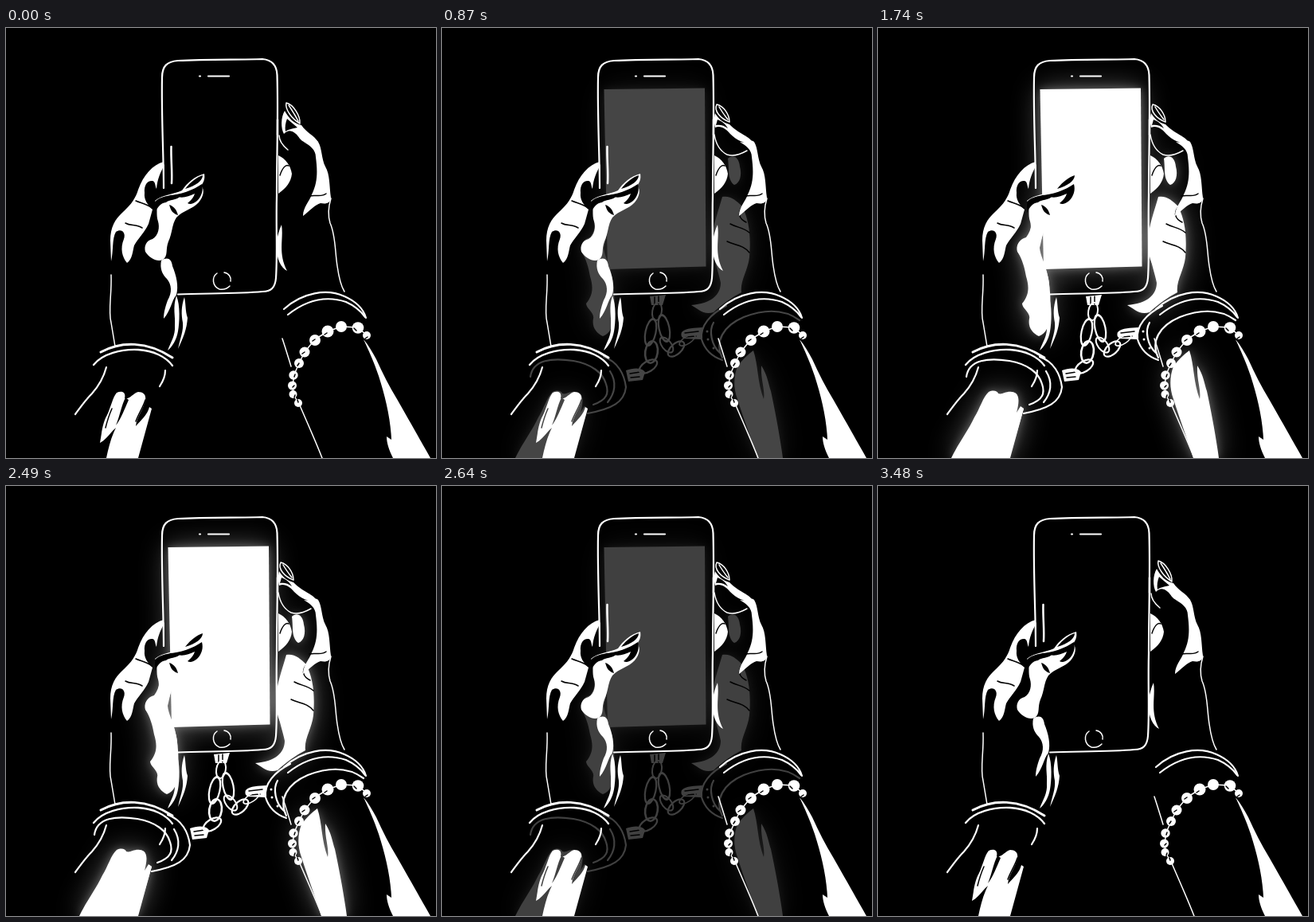
Write an HTML page that moves like this. It is 540 px wide and 540 px high and loops after 4.5 s.

```html
<!DOCTYPE html>
<html lang="en">
<head>
<meta charset="utf-8">
<title>Phone shackles</title>
<style>
html, body { margin: 0; width: 100%; height: 100%; overflow: hidden; background: #000; }
svg { display: block; width: 100%; height: 100%; }
.ink { fill: #fff; }
.cut { fill: #000; }
.line { fill: none; stroke: #fff; stroke-width: 2.2; stroke-linecap: round; stroke-linejoin: round; }
.crease { fill: none; stroke: #000; stroke-width: 1.5; stroke-linecap: round; }
.thin { stroke-width: 1.5; }
.bold { stroke-width: 3; }
.near { filter: blur(6px); opacity: .28; }
.far { filter: blur(18px); opacity: .34; }
#lit, #up, #down { animation: 4500ms infinite; }
#lit { animation-name: light; opacity: 0; }
#up { animation-name: lift; animation-timing-function: step-end; }
#down { animation-name: tap; animation-timing-function: step-end; }
@keyframes light {
  0% { opacity: 0; }
  18.667% { opacity: 0; animation-timing-function: cubic-bezier(.333, 0, .667, 1); }
  20.667% { opacity: 1; }
  56% { opacity: 1; animation-timing-function: cubic-bezier(.333, 0, .667, 1); }
  60%, 100% { opacity: 0; }
}
@keyframes lift { 0%, 60.66% { opacity: 1; } 18.66% { opacity: 0; } 100% { opacity: 1; } }
@keyframes tap { 0%, 60.66% { opacity: 0; } 18.66% { opacity: 1; } 100% { opacity: 0; } }
</style>
</head>
<body>
<svg viewBox="0 0 540 540">
  <defs>
    <ellipse id="link" class="line" rx="6.500" ry="12.500"/>
    <g id="shine" class="ink">
      <path d="M203.500 77L330 75.500L331.500 299.500L208 303Z"/>
      <!-- left palm and arm -->
      <path d="M197 223C206 226 213 232 213 240C207 252 206 266 203 276C204 286 209 294 212 306C217 325 217 345 216 362C215 374 211 384 202 387C194 383 188 376 190 365C192 358 181 352 181 346C190 335 190 325 186 312C184 300 181 291 176 282C173 272 178 265 186 263C194 253 194 238 197 223Z"/>
      <path d="M139 457C145 454 150 456 151 459C156 461 160 456 168 457C178 458 178 468 174 483L179 475L183 478L165 540H92C102 520 113 506 121 489C128 478 132 463 139 457Z"/>
      <!-- right palm, finger and arm -->
      <path d="M352 212C347 230 340 248 339 266C340 288 347 305 350 320C350 335 338 346 313 348C321 352 328 361 341 357C352 347 364 338 376 332C374 318 384 305 386 288C388 262 386 242 377 224C370 217 362 210 352 212Z"/>
      <path d="M359 164C365 158 373 162 374 174C377 185 374 195 367 197C358 190 361 178 359 164Z"/>
      <path d="M391 405C397 422 396 446 404 466C406 455 400 442 401 424C409 436 410 448 413 456C418 480 424 510 428 540H396C388 515 378 488 371 466C366 452 366 438 371 425C378 416 384 410 391 405Z"/>
    </g>
  </defs>

  <!-- arms -->
  <path class="ink" d="M139 458C145 455 151 457 149 465C155 467 159 459 166 457C173 457 176 461 175 467C173 479 164 488 163 500C170 492 178 485 180 476L183 478L166 540H126C129 526 132 514 138 502C131 508 126 517 118 521C120 510 121 496 127 486C132 475 134 464 139 458Z"/>
  <path class="cut" d="M150 464C145 474 143 487 138 499C145 490 149 478 154 467Z"/>
  <path class="crease" d="M133 478C129 487 127 494 125 502M175 467C172 477 167 483 163 494"/>
  <path class="line thin" d="M347 390C351 402 354 412 358 425M369 474C378 495 388 517 397 540"/>
  <path class="ink" d="M449 391C455 398 460 407 465 416C473 434 482 451 491 466C507 494 520 517 533 540H486C481 530 478 521 478 513L484 517C483 490 476 462 468 437C462 419 455 404 449 391Z"/>

  <g id="lit">
    <use href="#shine" class="far"/>
    <use href="#shine" class="near"/>
    <use href="#shine"/>
    <path class="crease" d="M362 246C371 251 378 250 386 257M358 268C368 273 378 272 386 282M376 226C372 232 372 239 382 244"/>

    <!-- cuffs -->
    <path class="line" d="M111 438C114 416 139 414 165 418C188 422 202 433 206 447C210 459 207 467 190 473M203 413C221 419 229 435 231 451C229 470 214 478 183 484M211 431C220 445 217 459 208 470"/>
    <path class="line" d="M357 349C337 359 324 374 326 391C330 404 340 413 352 417M352 414C342 394 353 374 379 363C405 353 430 353 449 367M341 370C335 380 338 398 349 408"/>
    <g class="ink">
      <circle cx="333" cy="381" r="1.500"/><circle cx="334" cy="391" r="1.500"/><circle cx="341" cy="402" r="1.500"/>
      <path d="M261 337L281 335L277 348L263 348Z"/>
      <path d="M301 382C307 376 317 377 327 376L325 391L304 390C300 388 300 385 301 382Z"/>
      <path d="M231 430C240 427 250 426 255 432L252 442L234 444Z"/>
    </g>
    <path class="crease" d="M267 338V347M272 337V347M305 383L322 381M306 388L319 387M236 434L249 432M237 439L248 438"/>
    <g>
      <use href="#link" transform="translate(270 356) rotate(9) scale(.9)"/>
      <use href="#link" transform="translate(262 382) rotate(12) scale(1 1.350)"/>
      <use href="#link" transform="translate(279 377) rotate(-12) scale(1 1.350)"/>
      <use href="#link" transform="translate(263 407) rotate(8) scale(1.200 1.100)"/>
      <use href="#link" transform="translate(259 425) rotate(58)"/>
      <use href="#link" transform="translate(282 398) rotate(-38) scale(.9)"/>
      <use href="#link" transform="translate(294 403) rotate(48)"/>
      <use href="#link" transform="translate(308 392) rotate(58) scale(.7 .9)"/>
    </g>
  </g>

  <!-- phone -->
  <g class="line">
    <path d="M198 201C198 160 195 110 196 62C196 48 202 42 216 41C252 39 292 40 322 39C334 40 340 46 340.500 59C342 110 340 160 340 210C339 250 341 285 339 314C338 326 333 331 322 331C290 334 250 333 216 334.500"/>
    <path d="M207.500 149C207 166 209 180 208 195M341 115V134" class="bold" style="stroke-width:2.500"/>
    <path d="M254 60.500H280M243 60.500H244"/>
    <path class="thin" d="M265 308C258 313 259 324 268 328C273 329 278 327 281 324M274 307C280 308 283 313 282 318"/>
  </g>

  <!-- left hand -->
  <path class="ink" d="M198 168C184 172 173 184 166 203C163 213 158 221 147 231C137 240 131 250 131 267L132 293C135 281 133 264 138 256C145 251 151 257 148 265C143 277 146 288 152 295C159 290 159 280 161 273C166 264 174 257 179 246L184 228C178 222 173 216 174 207C173 197 178 191 184 192C188 193 187 199 189 202C190 190 194 181 198 174Z"/>
  <path class="crease" d="M163 217C169 220 176 220 183 226M150 245C157 249 163 246 171 251"/>
  <path class="line thin" d="M198 172V201M132 310C133 335 128 355 132 370L137 400"/>
  <path class="ink" d="M187 217C197 209 210 209 221 204C227 195 237 186 249 183C250 188 249 193 245 198C250 203 248 212 242 219C234 228 222 229 214 238C208 247 209 258 204 268C200 278 204 286 197 291C190 294 181 290 175 281C173 274 176 267 184 265C192 260 193 250 191 243C188 234 191 226 188 222Z"/>
  <g class="cut">
    <path d="M225 202C232 193 240 187 247 185C247 192 238 198 225 202Z"/>
    <path d="M204 210C218 210 236 203 246 196C248 203 246 211 240 217C235 221 231 222 228 220C233 216 236 212 237 208C230 211 223 214 216 212C211 211 207 212 204 210Z"/>
    <path d="M187 218C194 211 208 209 219 211C214 217 205 215 201 219C194 220 191 224 187 232Z"/>
    <path d="M205 222C211 224 214 228 216 235C209 233 207 229 205 222Z"/>
  </g>
  <g class="ink">
    <path d="M195 292C203 287 208 290 209 299C214 311 217 324 214 335C208 342 207 355 198 365C198 356 201 348 203 342C209 332 208 322 202 315C196 309 193 302 195 292Z"/>
    <path d="M214 336C219 348 218 370 216 381C214 392 209 400 203 405C207 394 213 386 212 374C213 361 209 352 214 336Z"/>
    <path d="M224 338C226 347 225 355 228 364C227 378 223 388 216 403C219 389 223 380 222 370C220 359 220 350 224 338Z"/>
  </g>
  <g class="line bold">
    <path d="M119 407C145 393 177 393 209 414"/>
    <path d="M110 423C121 409 145 403 166 404C185 405 201 413 209 424" style="stroke-width:2.300"/>
  </g>
  <path class="line" d="M200 430C200 438 197 444 193 450M126 426C122 441 116 450 108 459C99 468 93 477 87 485"/>

  <!-- right hand -->
  <g id="up">
    <path class="line thin" d="M352 94C350 102 359 114 369 120C370 111 361 96 352 94ZM355 97C359 103 364 111 367 117"/>
    <path class="ink" d="M350 104C345 112 345 126 349 133C356 125 364 131 369 139C374 145 381 146 392 143C386 134 378 132 371 122C361 120 355 113 350 104ZM353 114L366 125C360 126 353 128 351 130C350 124 351 119 353 114Z"/>
    <path class="line thin" d="M343 135C343 142 348 148 354 153"/>
  </g>
  <g id="down">
    <path class="line thin" d="M345 96C341 104 350 114 361 118C361 109 354 98 345 96ZM348 99C352 106 356 111 359 115"/>
    <path class="ink" d="M343 107C341 114 342 121 343 125C350 122 357 127 362 133C370 141 378 145 391 145C386 135 375 135 361 121C353 119 347 114 343 107ZM346 115C352 117 357 122 359 126C354 122 349 121 344 122Z"/>
    <path class="line thin" d="M342 134C344 146 350 155 358 159C367 162 376 158 383 154"/>
  </g>
  <g class="ink">
    <path d="M374 143C381 145 387 139 392 143C397 151 396 164 401 174C407 184 406 199 408 213C407 221 401 221 395 220C388 222 381 230 373 236C373 225 381 218 384 209C392 193 391 178 389 162C389 153 382 148 374 143Z"/>
    <path d="M342 160C351 164 357 172 359 183C358 193 352 201 342 208Z"/>
    <path d="M346 247C349 265 341 282 353 305C344 301 338 286 340 268C341 260 343 254 346 247Z"/>
  </g>
  <path class="crease" d="M344 185C347 176 351 171 355 173M381 211C389 209 396 213 402 208"/>
  <path class="line thin" d="M408 214C405 224 404 235 407 245C414 260 413 280 416 299C418 313 420 323 425 331"/>
  <g class="line">
    <path d="M349 353C372 332 403 327 425 337C439 343 449 353 452 364"/>
    <path d="M354 360C378 341 403 336 427 344C438 349 446 356 451 363"/>
  </g>

  <!-- bracelet -->
  <path class="line thin" d="M453 386L442 376L421 375L404 381L388 391L375 407L368 421L362 435L360 449L361 460L367 471"/>
  <g class="ink">
    <circle cx="453" cy="386" r="5"/><circle cx="442" cy="376.500" r="7.300"/>
    <circle cx="421" cy="375" r="7"/><circle cx="404" cy="381" r="7.500"/>
    <circle cx="388" cy="392" r="7"/><circle cx="375" cy="407" r="6.500"/>
    <circle cx="368" cy="421" r="6"/><circle cx="361" cy="436" r="5.700"/>
    <circle cx="359.500" cy="449" r="5.500"/><circle cx="360.500" cy="460" r="5"/>
    <circle cx="367" cy="471" r="5"/>
  </g>
  <path class="crease" d="M437 377L440 380M400 385L403 383M385 393L388 391M372 409L375 407M366 424L368 421M362 438L363 435M360 451L362 449M362 464L363 461M366 467L367 470M451 390L454 388"/>
</svg>
</body>
</html>
```
